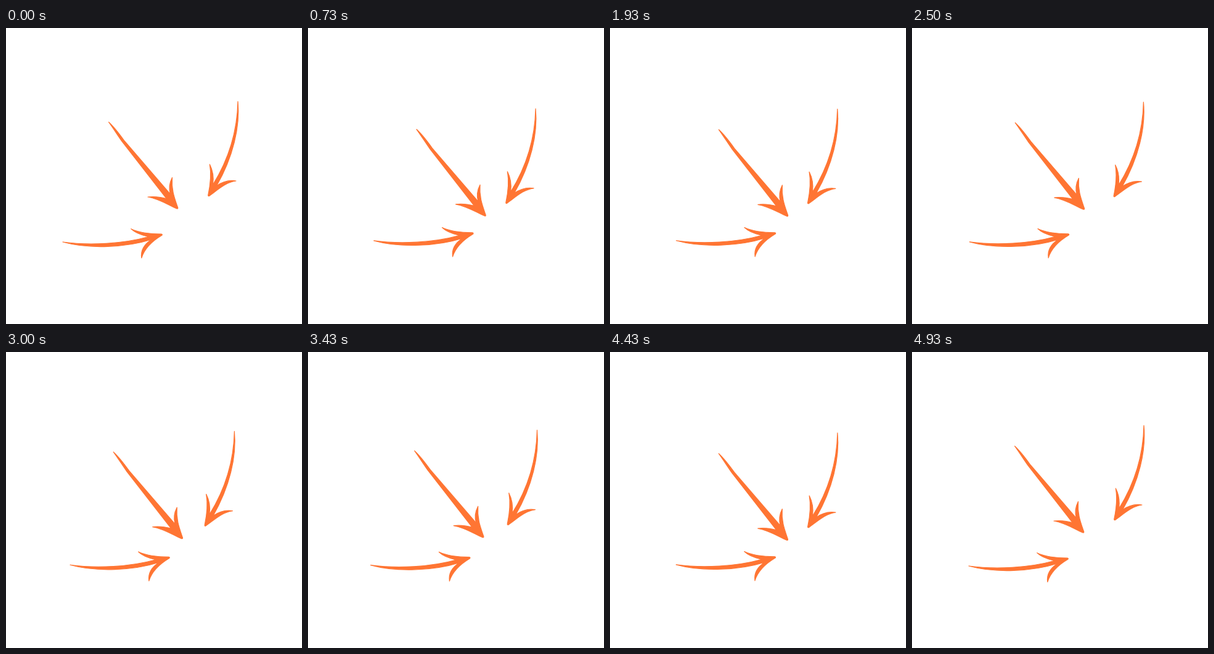
Write an HTML page that moves like this. It is 480 px wide and 480 px high and loops after 5.01 s.

```html
<!DOCTYPE html>
<html>
<head>
<meta charset="utf-8">
<style>
  html, body { margin: 0; height: 100%; overflow: hidden; background: #fff; }
  svg { display: block; width: 100vw; height: 100vh; }
  path { fill: #ff7533; stroke: #ff7533; stroke-width: 1.2; stroke-linejoin: round; }
</style>
</head>
<body>
<svg viewBox="0 0 480 480">
  <path data-push="10.3 12.8" d="M166.5 152.5C176 161 184 172 192 183L266.5 269.5C264 261 265 251 269.5 242.5C268 262 273 275 278.7 291.5Q279 293.5 277 293C263 287 248 277 230 274C242 272.5 252 274.5 260 276.5L188 184C181 174 174 163 166.5 152.5Z"/>
  <path data-push="-7.5 12.8" d="M376 119C380 160 368 210 341.5 256C350 250 361 246 373 248C356 250 343 263 329.5 272.5Q327.5 273 327.8 271C331 256 333 236 330.3 221C336 232 337 243 335.5 254C361 213 375 168 376 119Z"/>
  <path data-push="16 -2.3" d="M92 347C135 353 190 350 231 338.5C220 336 209 332 202.7 325.7C216 332 236 334 252 334Q254 334.5 253 336C238 345 225 356 219.8 373C218 360 225 350 236 343C195 356 135 359 92 347Z"/>
</svg>
<script>
  const LOOP = 5010, PERIOD = 23.4, START = 5.4;
  const arrows = [...document.querySelectorAll('path')].map(el => ({
    el, push: el.dataset.push.split(' ').map(Number)
  }));

  // Twenty steps a second, alternately 30 and 70 ms long
  const stepAt = ms => Math.min(99, 2 * Math.floor(ms / 100) + (ms % 100 >= 30));

  // Rest briefly, then swing forward and back
  const swing = step => step < START ? 0
    : (1 - Math.cos(2 * Math.PI * (step - START) / PERIOD)) / 2;

  function draw(now) {
    const k = swing(stepAt(now % LOOP));
    for (const { el, push: [x, y] } of arrows)
      el.setAttribute('transform', `translate(${x * k} ${y * k})`);
  }

  const start = performance.now();
  function tick() {
    draw(performance.now() - start);
    requestAnimationFrame(tick);
  }
  tick();
</script>
</body>
</html>
```
